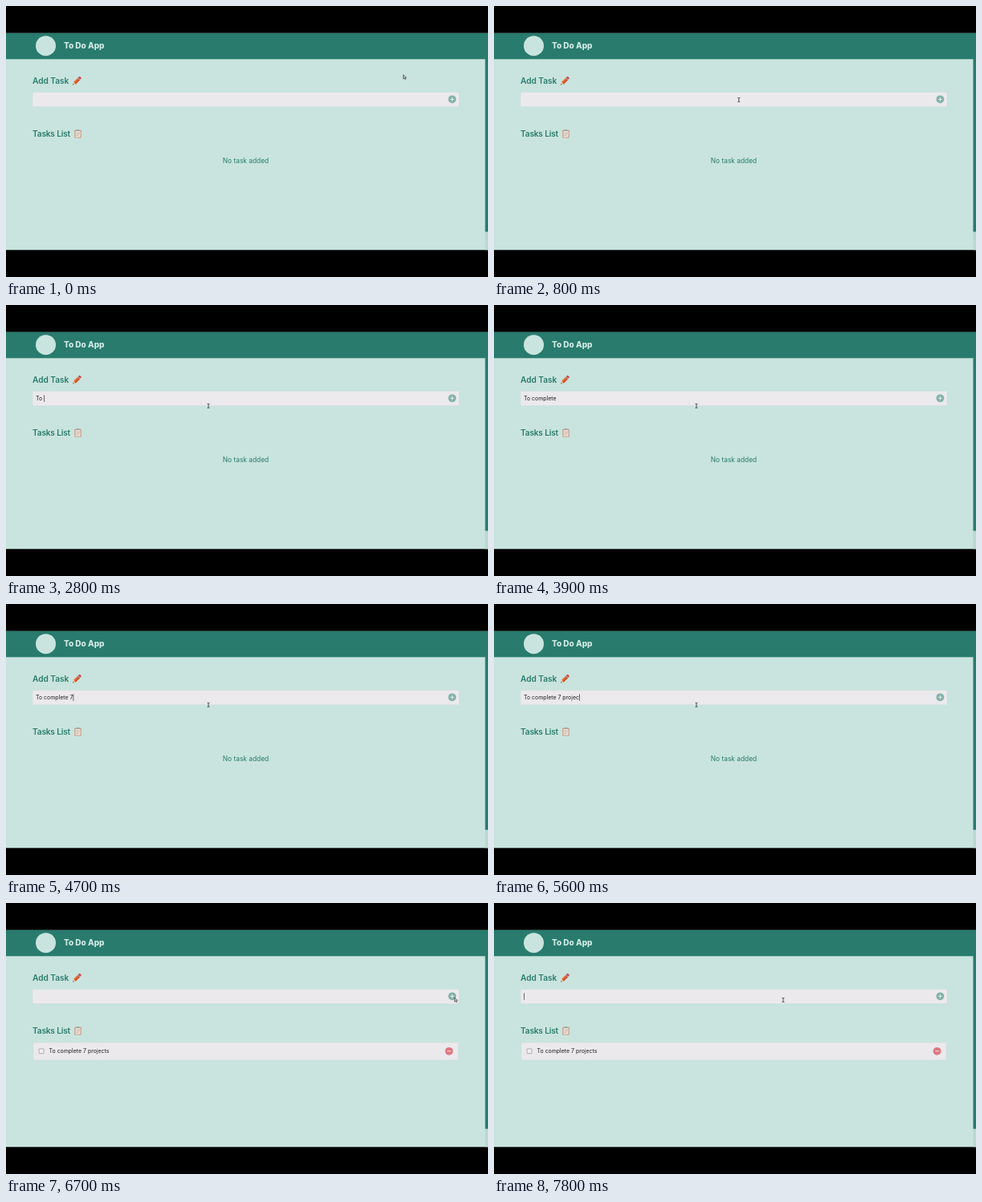
Recreate the animation shown at these times as an HTML page. Size 600 by 338 pixels, loop 8 s.

```html
<!DOCTYPE html>
<html lang="en">
<head>
<meta charset="utf-8">
<title>Task list</title>
<style>
  html, body { margin: 0; width: 100%; height: 100%; overflow: hidden; background: #000; }
  svg { display: block; width: 600px; height: 338px; }
  text { font-family: Inter, "Open Sans", sans-serif; white-space: pre; }
  .head { font-size: 10.1px; font-weight: 600; fill: #287b6d; }
  .task { font-size: 6.95px; fill: #222; }
  .field { fill: #ebe9eb; stroke: #b5d0ca; stroke-opacity: .35; stroke-width: .6; }
</style>
</head>
<body>
<svg viewBox="0 0 600 338">
  <rect width="600" height="338" fill="#000"/>
  <rect y="33.8" width="600" height="270.5" fill="#c9e4de"/>
  <rect y="66" width="596.5" height="1" fill="#287b6d" opacity=".12"/>
  <rect y="33.8" width="600" height="32.4" fill="#287b6d"/>
  <rect x="596.5" y="66" width="3.5" height="238.3" fill="#b9d8d1"/>
  <rect x="596.5" y="66" width="3.5" height="215.6" fill="#287b6d"/>

  <circle cx="49.5" cy="49.7" r="12.5" fill="#c9e4de"/>
  <text x="72" y="53.3" font-size="10" font-weight="800" fill="#d3ebe6">To Do App</text>

  <text class="head" x="33" y="96.8">Add Task</text>
  <g transform="translate(83.2 98.4) rotate(-45)">
    <path d="M0 0L3.2-1.8V1.8Z" fill="#e8bd94"/>
    <path d="M0 0L1.3-.7V.7Z" fill="#493b38"/>
    <rect x="3.2" y="-1.8" width="8" height="3.6" fill="#e8642f"/>
    <rect x="3.2" y=".5" width="8" height="1.3" fill="#c94b29"/>
    <rect x="10.1" y="-1.8" width="1" height="3.6" fill="#9bb0b0"/>
    <rect x="11.1" y="-1.8" width="2.6" height="3.6" rx="1" fill="#cf4150"/>
  </g>

  <rect class="field" x="33" y="107.5" width="531" height="18.2" rx="1.5"/>
  <text id="entry" class="task" x="37" y="118.9"></text>
  <rect id="caret" y="112.3" width=".7" height="8.5" fill="#333"/>
  <circle cx="555.4" cy="116.3" r="4.9" fill="#80b2a8"/>
  <path d="M552.9 116.3h5M555.4 113.8v5" stroke="#e4ebe9"/>

  <text class="head" x="33" y="162.9" letter-spacing="-.16">Tasks List</text>
  <rect x="85.3" y="154.8" width="8.4" height="9.8" rx=".9" fill="#c6937a"/>
  <rect x="86.3" y="156" width="6.4" height="7.7" fill="#ebdfd6"/>
  <rect x="87.6" y="154.1" width="3.8" height="1.8" rx=".7" fill="#a3aba8"/>
  <path d="M87.3 158h4.4M87.3 159.8h4.4M87.3 161.6h3" stroke="#b99f96" stroke-width=".6"/>

  <text id="empty" x="298.5" y="195.7" text-anchor="middle" font-size="8.4" fill="#287b6d">No task added</text>
  <g id="item">
    <rect class="field" x="34" y="174" width="529" height="21.9" rx="2"/>
    <rect x="41.1" y="181.9" width="5.8" height="5.8" rx=".5" fill="#f3f2f3" stroke="#808080" stroke-width=".6"/>
    <text class="task" x="53.6" y="187.1">To complete 7 projects</text>
    <circle cx="551.6" cy="184.8" r="4.9" fill="#df7681"/>
    <path d="M549.1 184.8h5" stroke="#f0dfe2"/>
  </g>

  <path id="arrow" d="M0 0V5.1L1.2 4.1L2 5.9L2.9 5.5L2.1 3.8H3.7Z" fill="#d5d5d5" stroke="#222" stroke-width=".6" stroke-linejoin="round"/>
  <path id="beam" d="M-1.4-2.6Q0-2.6 0-2V2Q0 2.6-1.4 2.6M1.4-2.6Q0-2.6 0-2M0 2Q0 2.6 1.4 2.6" fill="none" stroke="#222" stroke-width=".8"/>
</svg>
<script>
const LOOP = 8000, STEP = 100;
const KEY_GAP = 80, BLINK = 220;
const FOCUS = 1550, BLUR = 6600, SUBMIT = 6700, REFOCUS = 7300;

// Each burst is typed at an even pace from its start time.
const bursts = [
  ["To", 2600], [" comp", 2750], ["lete", 3310], [" ", 3670],
  ["7", 4250], [" pro", 4950], ["jects", 5400]
];
const keys = bursts.flatMap(([text, at]) =>
  [...text].map((char, i) => ({ char, at: at + i * KEY_GAP })));

// Pointer moves, each easing out from where the last one ended.
const home = { x: 494.6, y: 85.7 };
const moves = [
  { from: 0, to: 1500, x: 252, y: 125.8 },
  { from: 5950, to: 6400, x: 578, y: 121 },
  { from: 6400, to: 6600, x: 558.4, y: 117.9 },
  { from: SUBMIT, to: REFOCUS, x: 360, y: 121 }
];

const el = id => document.getElementById(id);
const entry = el("entry"), caret = el("caret"), empty = el("empty"), item = el("item");
const arrow = el("arrow"), beam = el("beam");
const show = (node, on) => node.setAttribute("visibility", on ? "visible" : "hidden");
const easeOut = k => 1 - (1 - k) ** 2;

function pointerAt(t) {
  return moves.reduce((p, m) => {
    const k = easeOut(Math.min(1, Math.max(0, (t - m.from) / (m.to - m.from))));
    return { x: p.x + (m.x - p.x) * k, y: p.y + (m.y - p.y) * k };
  }, home);
}

// The caret restarts its blink at every key press or click.
function caretOn(t) {
  if (t < FOCUS || (t >= BLUR && t < REFOCUS)) return false;
  const resets = [FOCUS, REFOCUS, ...keys.map(k => k.at)];
  const last = Math.max(...resets.filter(at => at <= t));
  return Math.floor((t - last) / BLINK) % 2 === 0;
}

function draw(t) {
  const done = t >= SUBMIT;
  const text = done ? "" : keys.filter(k => k.at <= t).map(k => k.char).join("");
  entry.textContent = text;
  caret.setAttribute("x", 37.2 + (text ? entry.getComputedTextLength() : 0));
  show(caret, caretOn(t));
  show(empty, !done);
  show(item, done);

  const { x, y } = pointerAt(t);
  const inField = x > 33 && x < 549 && y > 107.5 && y < 126;
  show(beam, inField);
  show(arrow, !inField);
  for (const c of [beam, arrow]) c.setAttribute("transform", `translate(${x} ${y})`);
}

const start = performance.now();
function tick() {
  const t = (performance.now() - start) % LOOP;
  draw(Math.floor(t / STEP) * STEP);
  requestAnimationFrame(tick);
}
tick();
</script>
</body>
</html>
```
